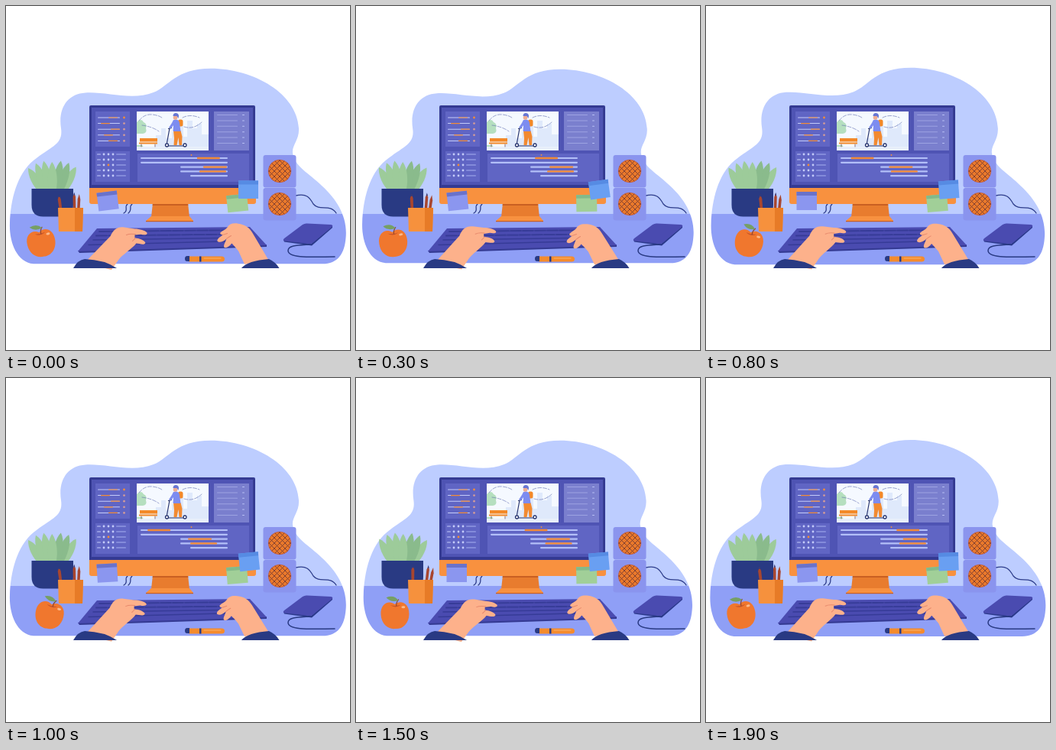
Animation, 450 px wide and 450 px high, one loop 2 s. Source, as an HTML page:

```html
<!DOCTYPE html>
<html lang="en">
<head>
<meta charset="utf-8">
<title>Desk</title>
<style>
html, body { margin: 0; width: 100%; height: 100%; overflow: hidden; background: #fff; }
svg { display: block; width: 100%; height: 100%; }
.line { fill: none; stroke-linecap: round; stroke-linejoin: round; }
</style>
</head>
<body>
<svg viewBox="0 0 450 450">
  <defs>
    <clipPath id="cloudClip"><path id="cloud" d="M36 337.3C13 335 4 307 5 284C6 254 14 220 36 202C60 183 75 181 72 160C68 134 80 115 104 113.5C132 112 165 124 193 113C213 105 222 81.7 268 81.7C325 82 381 115 383 160C384 175 374 182 375 192C377 210 397 219 413 235C434 254 447 277 444.5 303C443 324 434 337.3 414 337.3Z"/></clipPath>
    <clipPath id="videoClip"><path d="M171 138h94v51h-94z"/></clipPath>
    <clipPath id="grille"><circle r="14.7"/></clipPath>
    <g id="speaker">
      <rect x="-21.5" y="-21" width="43" height="42.5" rx="3" fill="#8a94ee"/>
      <circle r="14.7" fill="#ea792b"/>
      <g clip-path="url(#grille)"><path id="mesh" class="line" stroke="#7a3d33" stroke-width=".9"/></g>
      <circle class="line" r="14.7" stroke="#b75033" stroke-width=".7"/>
    </g>
  </defs>

  <g clip-path="url(#cloudClip)">
    <path fill="#bdcdff" d="M0 70h450v202H0z"/>
    <path fill="#8f9ff6" d="M0 272h450v80H0z"/>
  </g>

  <!-- Cables and speakers -->
  <path class="line" stroke="#2d3c8a" stroke-width="1.3" d="M379 248C393 245 397 250 402 259C410 269 424 258 432 271M154 271C161 267 154 263 159 259M160 271C166 266 160 263 165 259"/>
  <use href="#speaker" x="358" y="216"/>
  <use href="#speaker" x="358" y="259"/>

  <!-- Monitor -->
  <path fill="#e87c2e" d="M192 258h46l2 18h-50z"/>
  <path fill="#c95f22" d="M192 258h46l.4 3h-46.8z"/>
  <path fill="#f8913f" d="M190 275h50l5 6v1h-62v-1z"/>
  <path fill="#c95f22" d="M183 281h62v1.2h-62z"/>
  <path fill="#f8913f" d="M109 236h218v20q0 3-3 3H112q-3 0-3-3z"/>
  <path fill="#343a92" d="M111 130h213q2 0 2 2v106H109V132q0-2 2-2z"/>
  <path fill="#4f54b4" d="M112 133h211v101H112z"/>
  <path fill="#6065c4" d="M117 138h45v46h-45zM117 190h45v40h-45zM172 193h146v37H172z"/>
  <path fill="#7a7fce" d="M272 138h46v51h-46z"/>
  <g id="controls"></g>
  <g id="code"></g>
  <circle cx="242.5" cy="195" r=".9" fill="#f28b37"/>

  <g clip-path="url(#videoClip)">
    <path fill="#f5f9ff" d="M171 138h94v51h-94z"/>
    <path fill="#dfe9fb" d="M196 186v-17h7v-9h6v13h8v-8h6v-9h9v15h5v-21h7v10h6v-6h6v14h9v18z"/>
    <path fill="#b5dfbf" d="M171 152q6-6 9 0q5 2 3 8q2 6-4 7h-8zM171 182h7q4 4 3 7h-10z"/>
    <path fill="#e8effa" d="M171 184h94v5h-94z"/>
    <path fill="#f38928" d="M175 173h23v4.500h-23zM174 178.500h24v2h-24z"/>
    <path class="line" stroke="#6b4a58" stroke-width=".8" d="M177 181v3M195 181v3"/>
    <path class="line" stroke="#616caf" stroke-width=".6" stroke-dasharray="5 2" d="M174 150q7-9 17-8t14 5M178 156q14 2 22 8M231 146q10-5 22 0M233 158q12 4 23-6"/>
    <path class="line" stroke="#27346e" stroke-width="1.2" d="M212.500 160.500l4-1M214 160l-3.500 19M212 183h20"/>
    <circle cx="210.500" cy="182" r="2" fill="#fff" stroke="#27346e" stroke-width="1.300"/>
    <circle cx="234" cy="182" r="2" fill="#fff" stroke="#27346e" stroke-width="1.300"/>
    <rect x="225" y="148.500" width="6.500" height="9" rx="2.500" fill="#f38928"/>
    <path fill="#f28a31" d="M219 163h9.500l2 8-.500 11h-3.500l-1-10-2 10h-4l.500-9z"/>
    <path fill="#7d8cf0" d="M219 149q7-2 8 4l1.500 11h-10l.500-8-3 4-3-1 4-6z"/>
    <circle cx="221.500" cy="146" r="2.800" fill="#efab91"/>
    <path fill="#6876d3" d="M218.500 144q0-4 4-4q5 1 3 7l-2-3z"/>
  </g>

  <g id="leftNote"><path fill="#8b96ef" d="M118.500 243h26.500v24h-26.500z"/><path fill="#6a72ca" d="M118.500 243h26.500v5h-26.500z"/></g>
  <g id="greenNote"><path fill="#a1cf98" d="M288 247h27v22h-27z"/><path fill="#83b98a" d="M288 247h27v4.500h-27z"/></g>
  <g id="blueNote"><path fill="#699ff2" d="M304 228.500h26v23.500h-26z"/><path fill="#568be3" d="M304 228.500h26v5h-26z"/></g>

  <!-- Plant and pencils -->
  <g id="leaves"></g>
  <path fill="#293a83" d="M33.500 239h54.500v21q0 15.500-15 15.500H48.500q-15 0-15-15.500z"/>
  <g id="pencils" fill="#a8462f">
    <path d="M71.500 270l-1.500-18 2-6 2 6 1 18z"/><path d="M89 270l1-20 2-5 1.500 5-1 20z"/><path d="M94 270l2-17 2.500-6 1 7-2 16z"/>
    <path fill="#293a83" d="M71 249l1-4 1.200 4zM91 248l1-4 1 4z"/>
  </g>
  <path fill="#f6913d" d="M68 264h33l-1 31H69z"/>
  <path fill="#e77b27" d="M90 264h11l-1 31H90z"/>

  <g id="apple">
    <path fill="#f0772e" d="M0-13C7-19 19-15 18.500 0C18 13 9 20 0 19C-9 20-18 13-18.500 0C-19-15-7-19 0-13Z"/>
    <path fill="#c95528" d="M-6-12q7 5 14 0q-7 2-14 0z"/>
    <path class="line" stroke="#8d4631" stroke-width="1.200" d="M2-11q0-5 3-8"/>
    <path fill="#769f65" d="M5-18q-6-8-16-4q6 7 16 4z"/>
    <ellipse cx="11" cy="-9" rx="2.500" ry="1.500" fill="#fbb98a"/>
  </g>

  <!-- Keyboard, pen and tablet -->
  <path fill="#343a92" d="M94 320l247-8v3L96 323z"/>
  <path fill="#4a4bb0" d="M119 291L319 289 341 313 94 321z"/>
  <path class="line" stroke="#363b97" stroke-width="1.800" stroke-dasharray="14 2" d="M122 295L314 293M118 300.500L312 298.500"/>
  <path class="line" stroke="#363b97" stroke-width="1.300" d="M114 306L317 303M108 312.500L322 307"/>
  <path fill="#f58b2d" d="M239 327.500h43q4 0 4 3.500t-4 3.500h-43z"/>
  <path fill="#293a83" d="M240 327h-3q-3 0-3 3.500t3 3.500h3zM253 327.500h2.500v7H253z"/>
  <path class="line" stroke="#fbb36c" d="M259 330h22"/>
  <path fill="#2b398b" d="M363 306l36 5 28-24v3l-27 23.500-36-5z"/>
  <path fill="#4a4bb0" d="M394 284.500l31 1.500q4 1 1 3.500l-25 20.500q-2 1.500-5 1l-31-3.500q-4-1-1-3.500l24-18q3-2 6-1.500z"/>
  <path class="line" stroke="#293a83" stroke-width="1.500" d="M397 312C382 313 369 313 369 320C369 331 407 328 430 328"/>

  <!-- Hands -->
  <g id="leftHand">
    <path fill="#fdb18b" d="M103 336L136 301C140 292 145 288 154 289L168 291C174 291 182 293 184 296C185 299 180 299 176 298L168 299V303C174 303 181 306 182 309C181 313 174 310 170 310C165 317 152 325 147 332L138 345Z"/>
    <path class="line" stroke="#e78a6d" d="M169 298q-8-1-12 1M169 303l-4 4"/>
  </g>
  <path fill="#293a83" d="M88 343q6-11 15-12q26 1 42 12z"/>
  <g id="rightHand">
    <path fill="#fdb18b" d="M312 338L304 321C300 316 297 313 295 311C291 316 287 318 285 316C284 313 287 309 288 305C284 309 278 311 276 308C276 304 280 303 283 300C281 300 279 299 280 297C283 294 287 293 289 290C291 286 296 284 303 285C312 286 318 290 322 297L344 333Z"/>
    <path class="line" stroke="#e78a6d" d="M283 300l6-2M288 305q4-3 6-4"/>
  </g>
  <path fill="#293a83" d="M308 343q8-10 36-12q9 4 13.500 12z"/>
</svg>
<script>
const LOOP = 2000, STEP = 100;
const $ = id => document.getElementById(id);

function add(parent, tag, attrs) {
  const node = document.createElementNS('http://www.w3.org/2000/svg', tag);
  for (const key in attrs) node.setAttribute(key, attrs[key]);
  return parent.appendChild(node);
}
const bar = (parent, x, y, width, fill, height = 1.8) =>
  add(parent, 'rect', { x, y: y - height / 2, width, height, rx: height / 2, fill });

// Speaker mesh
let mesh = '';
for (let i = -21; i <= 21; i += 7) mesh += `M${i - 16} -16L${i + 16} 16M${i + 16} -16L${i - 16} 16`;
$('mesh').setAttribute('d', mesh);

// Side panels
const controls = $('controls');
[14, 4, 17, 8, 14].forEach((offset, i) => {
  const y = 146 + i * 7.6;
  bar(controls, 120, y, 29, '#c4ccfa', 1);
  bar(controls, 120 + offset, y, 12, '#f28b37', 1.2);
  add(controls, 'circle', { cx: 154.5, cy: y, r: 1.4, fill: i ? '#d09a9a' : '#f28b37' });
});
for (let row = 0; row < 5; row++) {
  const y = 194 + row * 7;
  bar(controls, 119, y, 5, '#c4ccfa', 1.2);
  [128, 134, 140].forEach((cx, col) =>
    add(controls, 'circle', { cx, cy: y, r: 1.4, fill: col === 1 && row === 2 ? '#f28b37' : '#c4ccfa' }));
  bar(controls, 144, y, 13, '#a5aff0', .9);
}
for (let row = 0; row < 6; row++) {
  bar(controls, 276, 142.5 + row * 7.4, 27, '#9da3e2', 1);
  bar(controls, 309, 142.5 + row * 7.4, 3, '#b9c1f5', 1);
}

// Code rows and their sliding highlights
const code = $('code');
[176, 176, 228, 228, 241].forEach((x, i) =>
  bar(code, x, 199 + i * 5.8, 290 - x, '#b3bff8', 2.2));
const marks = [[199, 30], [210.6, 31], [216.4, 35]].map(([y, width]) =>
  bar(code, 250, y, width, '#f28b37', 2.4));

// Leaves fan out from the pot
for (const [spread, length] of [[-44, 37], [44, 37], [-28, 40], [29, 40], [-14, 41], [15, 41], [0, 39]])
  add($('leaves'), 'path', {
    d: `M-4 0C-8 -14 -6 ${8 - length} 0 ${-length}C6 ${8 - length} 8 -14 4 0Z`,
    fill: spread % 2 ? '#8abb8c' : '#9dcb9a',
    transform: `translate(${61 + spread * .28} 243) rotate(${spread * .7})`
  });

const times = [0, 300, 600, 800, 1200, 1500, 1900, 2000];
const sways = {
  leftNote: [132, 244, [-7, -6, 0, 0, -7, 0, -3]],
  greenNote: [301, 247, [-6, -1, 0, -5, -4, -1, -5]],
  blueNote: [317, 231, [0, -8, 0, -4, -8, -5, -2]],
  leftHand: [120, 338, [.7, -1.2, 1.3, -1.2, 0, 1, -1.2]],
  rightHand: [328, 335, [.8, -.8, -.5, .2, -1, .7, .5]]
};

function track(values, time) {
  const i = times.findIndex((start, n) => time >= start && time < times[n + 1]);
  const p = (time - times[i]) / (times[i + 1] - times[i]);
  const ease = (1 - Math.cos(Math.PI * p)) / 2;
  return values[i] + (values[(i + 1) % values.length] - values[i]) * ease;
}

const move = (id, transform) => $(id).setAttribute('transform', transform);

function draw(time) {
  const turn = 2 * Math.PI * time / LOOP;
  const slide = Math.cos(turn + .094), pulse = Math.cos(2 * turn);
  const wide = .989 + .011 * pulse, tall = 1 - .008 * Math.sin(2 * turn);
  move('cloud', `translate(225 210) scale(${wide} ${tall}) translate(-225 -210)`);
  move('apple', `translate(${51.5 - 5.5 * slide} 309) rotate(${-12 * slide})`);
  move('leaves', `rotate(${-1.2 * pulse} 61 241)`);
  move('pencils', `rotate(${-4 * pulse} 84 285)`);
  for (const [id, [x, y, values]] of Object.entries(sways))
    move(id, `rotate(${track(values, time)} ${x} ${y})`);

  marks[0].setAttribute('x', 217.5 + 32.5 * slide);
  marks[1].setAttribute('x', 248 + 10 * slide);
  marks[2].setAttribute('x', 247 + 6 * slide);
}

const begin = performance.now();
function tick() {
  const elapsed = (performance.now() - begin) % LOOP;
  draw(Math.floor(elapsed / STEP) * STEP);
  requestAnimationFrame(tick);
}
tick();
</script>
</body>
</html>
```
